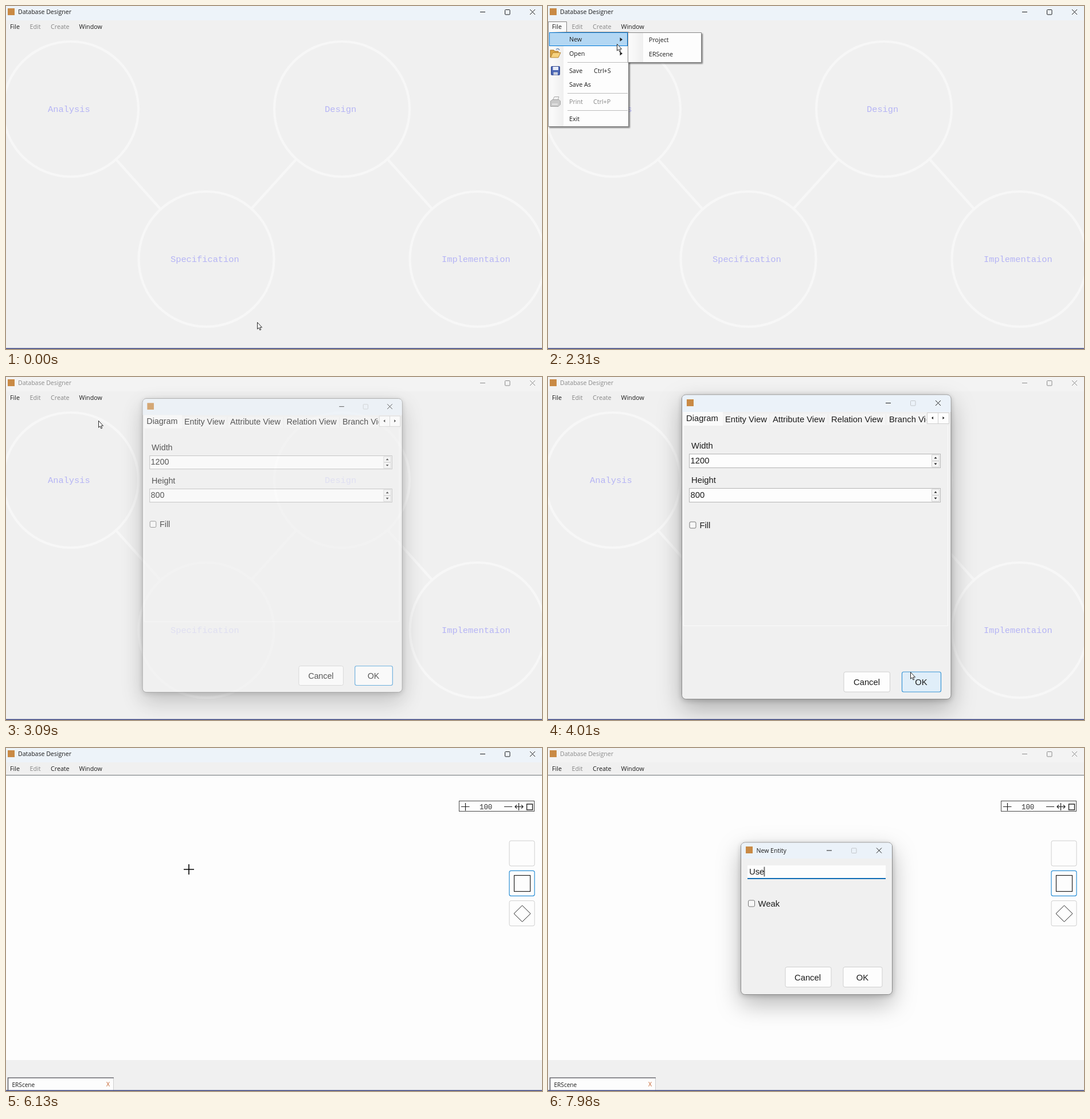
An HTML page that plays this animation: 935x599 px, repeating every 8 s.

```html
<!DOCTYPE html>
<html lang="en">
<head>
<meta charset="utf-8">
<title>Database Designer</title>
<style>
html, body { margin: 0; width: 100%; height: 100%; overflow: hidden; background: #f0f0f0; }
svg { display: block; width: 935px; height: 599px; }
text { white-space: pre; }
.ui { font: 10.7px "Open Sans", "Noto Sans", sans-serif; fill: #1c1c1c; }
.cap { font-size: 10.55px; fill: currentColor; }
.off { fill: #868686; }
.form { font: 14.8px "Liberation Sans", Arial, sans-serif; fill: #1c1c1c; }
.mono { font: 15.35px "Liberation Mono", "Courier New", monospace; fill: #b5b4f5; }
.mid { text-anchor: middle; }
.line { fill: none; stroke: #222; }
.btn { fill: #fdfdfd; stroke: #cfcfcf; }
.picked { fill: #b3d7f3; stroke: #0078d7; }
.sep { stroke: #bdbdbd; }
.field { fill: #fdfdfd; stroke: #b4b4b4; }
.check { fill: #f7f7f7; stroke: #767676; }
.glass { stroke: #8b8b8b; filter: drop-shadow(0 2px 5px rgba(0,0,0,.2)) drop-shadow(0 16px 20px rgba(0,0,0,.27)); }
.menu { fill: #fdfdfd; stroke: #858585; filter: drop-shadow(2.5px 2.5px 1px rgba(0,0,0,.45)); }

/* 1% = 80 ms */
.t { animation: 8s infinite step-end; }

#bar { color: #1c1c1c; animation-name: focus; }
#barBg { animation-name: barBg; }
@keyframes focus {
  0% { color: #1c1c1c } 36.9% { color: #8b8b8b } 55.7% { color: #1c1c1c } 83.8%, to { color: #8b8b8b }
}
@keyframes barBg {
  0% { fill: #edf3f9 } 37.8% { fill: #f3f3f3 } 55.7% { fill: #edf3f9 } 84.7%, to { fill: #f3f3f3 }
}

#fileHover { animation-name: fileHover; }
#fileMenu { animation-name: fileMenu; }
#newRow { animation-name: newRow; }
#subMenu { animation-name: subMenu; }
#subRow { animation-name: subRow; }
@keyframes fileHover { 0% { opacity: 0 } 14.6% { opacity: 1 } 16.2%, to { opacity: 0 } }
@keyframes fileMenu { 0% { opacity: 0 } 16.2% { opacity: 1 } 34.75%, to { opacity: 0 } }
@keyframes newRow { 0% { opacity: 0 } 20.3%, to { opacity: 1 } }
@keyframes subMenu { 0% { opacity: 0 } 25% { opacity: 1 } 34.75%, to { opacity: 0 } }
@keyframes subRow { 0% { opacity: 0 } 30%, to { opacity: 1 } }

#scene { animation-name: scene; }
#createOn { animation-name: scene; }
#tool { animation-name: tool; }
@keyframes scene { 0% { opacity: 0 } 54.1%, to { opacity: 1 } }
@keyframes tool {
  0% { fill: #fdfdfd; stroke: #cfcfcf }
  66.6% { fill: #e0eef9; stroke: #2b8fd6 }
  69.7% { fill: #cce4f7; stroke: #2b8fd6 }
  71.6% { fill: #e0eef9; stroke: #2b8fd6 }
  72.5%, to { fill: #fdfdfd; stroke: #2b8fd6 }
}

#sizeDlg { transform-origin: 366px 221px; animation-name: sizeDlg; }
#sizeOk { stroke: #3a96d6; animation-name: sizeOk; }
@keyframes sizeDlg {
  0% { opacity: 0 }
  36.9% { opacity: .2; transform: scale(.865) }
  37.75% { opacity: .72; transform: scale(.965) }
  38.7% { opacity: .95; transform: scale(.993) }
  39.6% { opacity: 1; transform: none }
  54.1% { opacity: .75; transform: scale(.98) }
  55% { opacity: .4; transform: scale(.94) }
  55.75% { opacity: .12; transform: scale(.91) }
  56.75%, to { opacity: 0 }
}
@keyframes sizeOk { 0% { fill: #fdfdfd } 50% { fill: #e0eef9 } 52.3%, to { fill: #cce4f7 } }

#entityDlg { transform-origin: 468px 297px; animation-name: entityDlg; }
@keyframes entityDlg {
  0% { opacity: 0 }
  83.8% { opacity: .2; transform: scale(.865) }
  84.7% { opacity: .72; transform: scale(.965) }
  85.7% { opacity: .95; transform: scale(.993) }
  86.6%, to { opacity: 1; transform: none }
}
#k1 { animation-name: k1; }
#k2 { animation-name: k2; }
#k3 { animation-name: k3; }
@keyframes k1 { 0% { fill-opacity: 0 } 96%, to { fill-opacity: 1 } }
@keyframes k2 { 0% { fill-opacity: 0 } 98%, to { fill-opacity: 1 } }
@keyframes k3 { 0% { fill-opacity: 0 } 99.7%, to { fill-opacity: 1 } }
#caret { animation-name: caret; }
@keyframes caret {
  0% { opacity: 1; transform: none }
  91.375% { opacity: 0 }
  96% { opacity: 1; transform: translate(10.7px) }
  98% { opacity: 1; transform: translate(18.1px) }
  99.7%, to { opacity: 1; transform: translate(26.3px) }
}

#cursor { animation-name: path; }
#arrow { animation-name: arrow; }
#cross { animation-name: cross; }
@keyframes arrow { 0% { opacity: 1 } 72.5% { opacity: 0 } 83.8% { opacity: 1 } 96%, to { opacity: 0 } }
@keyframes cross { 0% { opacity: 0 } 72.5% { opacity: 1 } 83.8%, to { opacity: 0 } }
@keyframes path {
  0% { transform: translate(438px, 552px) }
  .87% { transform: translate(438px, 552px); animation-timing-function: steps(3, start) }
  3.69% { transform: translate(360px, 455px); animation-timing-function: steps(4, start) }
  7.44% { transform: translate(110px, 165px); animation-timing-function: steps(4, start) }
  11.19% { transform: translate(35px, 72px) }
  11.75% { transform: translate(35px, 72px); animation-timing-function: steps(7, start) }
  17.9% { transform: translate(23px, 37px) }
  19.37% { transform: translate(23px, 37px); animation-timing-function: steps(4, start) }
  23.2% { transform: translate(54px, 61px) }
  24% { transform: translate(54px, 61px); animation-timing-function: steps(5, start) }
  28.9% { transform: translate(120px, 66px); animation-timing-function: steps(3, start) }
  31.9% { transform: translate(168px, 95px); animation-timing-function: steps(2, start) }
  33.9% { transform: translate(161px, 76px) }
  40.6% { transform: translate(161px, 76px); animation-timing-function: steps(5, start) }
  45.37% { transform: translate(430px, 330px); animation-timing-function: steps(6, start) }
  51% { transform: translate(632px, 515px) }
  51.37% { transform: translate(632px, 515px); animation-timing-function: steps(2, start) }
  53.25% { transform: translate(643px, 531px) }
  55.75% { transform: translate(643px, 531px); animation-timing-function: steps(5, start) }
  60.75% { transform: translate(731px, 405px); animation-timing-function: steps(6, start) }
  66.62% { transform: translate(924px, 236px); animation-timing-function: steps(2, start) }
  69.12% { transform: translate(914px, 239px) }
  71.62% { transform: translate(914px, 239px); animation-timing-function: steps(2, start) }
  73.57% { transform: translate(800px, 236px); animation-timing-function: steps(4, start) }
  77.47% { transform: translate(319px, 212px); animation-timing-function: steps(5, start) }
  81.8% { transform: translate(267px, 212px) }
  83.8%, to { transform: translate(275px, 222px) }
}
</style>
</head>
<body>
<svg viewBox="0 0 935 599">
  <defs>
    <linearGradient id="gutter"><stop stop-color="#fcfcfc"/><stop offset="1" stop-color="#efefef"/></linearGradient>
    <clipPath id="tabClip"><path d="M236 60H660V86H236Z"/></clipPath>
    <g id="ctl" fill="none" stroke="currentColor">
      <path d="M0 0H9M87 -4.5l9 9m0 -9l-9 9"/>
      <rect x="43.5" y="-4" width="8.5" height="8.5" rx="1" style="stroke:var(--max, currentColor)"/>
    </g>
    <g id="spin">
      <path d="M.5 .5H13.500V10.500H.5ZM.5 11.500H13.500V21.500H.5Z" fill="#f6f6f6" stroke="#d2d2d2"/>
      <path d="M4.500 7L7 4 9.500 7ZM4.500 15L7 18 9.500 15Z" fill="#222"/>
    </g>
  </defs>

  <rect width="935" height="599" fill="#f0f0f0"/>

  <!-- start page -->
  <g fill="none" stroke="#f7f7f7" stroke-width="4.2">
    <circle cx="113" cy="180" r="118"/>
    <circle cx="349.500" cy="442" r="118"/>
    <circle cx="586" cy="180" r="118"/>
    <circle cx="822.500" cy="442" r="118"/>
    <path d="M192 268L269 354M506 268L429 353M666 268L743 354"/>
  </g>
  <g class="mono">
    <text x="73" y="185">Analysis</text>
    <text x="287" y="447">Specification</text>
    <text x="556" y="185">Design</text>
    <text x="760" y="447">Implementaion</text>
  </g>

  <!-- diagram editor -->
  <g id="scene" class="t">
    <rect y="47" width="935" height="552" fill="#f0f0f0"/>
    <rect y="48" width="935" height="497" fill="#fdfdfd"/>
    <path d="M0 47.500H935" stroke="#6d7376"/>
    <rect x="790.500" y="92.500" width="131" height="18" fill="#fdfdfd" stroke="#4a4a4a"/>
    <path class="line" d="M794 102.500H808.500M801.500 96V109.500M869 102.500H883M888 102.500H902M894.500 96V109M891 99.500L888 102.500 891 105.500M899 99.500L902 102.500 899 105.500" stroke-width="1.2"/>
    <rect class="line" x="908.500" y="98" width="10" height="10" stroke-width="1.4"/>
    <text class="mono" x="826" y="107" style="font-size:12.4px;fill:#333">100</text>
    <rect class="btn" x="878" y="162" width="44" height="44" rx="3"/>
    <rect id="tool" class="btn t" x="878" y="214.300" width="44" height="44" rx="3" stroke-width="1.2"/>
    <rect class="btn" x="878" y="266.700" width="44" height="44" rx="3"/>
    <rect class="line" x="886.500" y="222.500" width="28" height="28" stroke-width="1.2"/>
    <path class="line" d="M900.500 275L915 289.300 900.500 303.500 886 289.300Z"/>
    <rect x="3" y="576" width="185" height="23" fill="#fdfdfd"/>
    <path d="M3.500 599V576H188" fill="none" stroke="#6a6a70" stroke-width="1.6"/>
    <path d="M187.500 577V598" stroke="#d0d0d0"/>
    <text class="ui" x="10.500" y="592" style="font-size:10.1px">ERScene</text>
    <text class="ui" x="175" y="591" style="font-size:10.500px;fill:#c4622d">X</text>
  </g>

  <!-- title and menu bar -->
  <g id="bar" class="t">
    <rect id="barBg" class="t" width="935" height="25" fill="#edf3f9"/>
    <rect x="3" y="4" width="12" height="12" fill="#c98a45"/>
    <text class="ui cap" x="21" y="14">Database Designer</text>
    <use href="#ctl" x="827" y="10.500"/>
  </g>
  <rect id="fileHover" class="picked t" x=".5" y="27.500" width="32" height="17"/>
  <g id="fileMenu" class="t">
    <path class="menu" d="M.5 45.500H140.500V210.500H.5Z"/>
    <rect x="1" y="46" width="26" height="164" fill="url(#gutter)"/>
    <path d="M.5 46V27.500H32.500V45" fill="#fafafa" stroke="#858585"/>
    <rect id="newRow" class="picked t" x="2.500" y="46.500" width="136" height="23"/>
    <path class="sep" d="M34 98.500H139M34 152.500H139M34 182.500H139"/>
    <path d="M125.500 55L130 58.500 125.500 62ZM125.500 79.500L130 83 125.500 86.500Z" fill="#222"/>
    <g class="ui">
      <text x="37" y="62">New</text>
      <text x="37" y="86.500">Open</text>
      <text x="37" y="116.500">Save</text>
      <text x="80" y="116.500">Ctrl+S</text>
      <text x="37" y="141">Save As</text>
      <text class="off" x="37" y="171">Print</text>
      <text class="off" x="79" y="171">Ctrl+P</text>
      <text x="37" y="201">Exit</text>
    </g>
    <path d="M4 90V77H10L12 79H18V82" fill="#d9a441" stroke="#a8742a"/>
    <path d="M4.500 90L8.500 81.500H22L18 90Z" fill="#f6d27e" stroke="#b58433"/>
    <path d="M14 76q4 -3 6 1" fill="none" stroke="#5a83b8" stroke-width="1.3"/>
    <rect x="5.500" y="105.500" width="15" height="15" rx="1" fill="#4a66b4" stroke="#33488c"/>
    <path d="M8.500 106H18V112H8.500Z" fill="#e8edf8"/>
    <path d="M9.500 115.500H17V120.500H9.500Z" fill="#c8cfdf"/>
    <path d="M8 165L11 158.500H19L17 165Z" fill="#f2f2f2" stroke="#aaa"/>
    <path d="M4.500 166L8 163.500H19L21.500 166V172L18 175.500H4.500Z" fill="#c9c9c9" stroke="#a2a2a2"/>
    <path d="M7 171.500H17" stroke="#efefef" stroke-width="1.500"/>
  </g>
  <g id="subMenu" class="t">
    <path class="menu" d="M139.500 46.500H267.500V98.500H139.500Z"/>
    <rect x="140" y="47" width="26" height="51" fill="url(#gutter)"/>
    <rect id="subRow" class="picked t" x="141.500" y="72.500" width="124" height="24"/>
    <g class="ui">
      <text x="176" y="63">Project</text>
      <text x="176" y="88">ERScene</text>
    </g>
  </g>
  <g class="ui">
    <text x="7" y="39.500">File</text>
    <text class="off" x="41.500" y="39.500">Edit</text>
    <text class="off" x="78" y="39.500">Create</text>
    <g id="createOn" class="t">
      <path d="M76 29H113V45H76Z" fill="#f0f0f0"/>
      <text x="78" y="39.500">Create</text>
    </g>
    <text x="127.500" y="39.500">Window</text>
  </g>
  <rect y="597.400" width="935" height="1.600" fill="#414b86"/>

  <!-- diagram size dialog -->
  <g id="sizeDlg" class="t" color="#1c1c1c" style="--max:#c2c6ca">
    <rect class="glass" x="233.500" y="31" width="469.500" height="531.500" rx="7" fill="#f0f0f0"/>
    <path d="M234 61V38q0 -6.500 6.500 -6.500H696q6.500 0 6.500 6.500V61Z" fill="#ebf2f9"/>
    <rect x="242" y="39" width="12" height="12" fill="#c98a45"/>
    <use href="#ctl" x="589" y="45.500"/>
    <path d="M305 64H660V84H305Z" fill="#f4f4f4"/>
    <path d="M236 61H305V85H236Z" fill="#fafafa"/>
    <path d="M386.500 65V83M488.500 65V83M589.500 65V83" stroke="#e9e9e9"/>
    <path d="M236.500 85V434.500H697.500V85" fill="none" stroke="#fafafa"/>
    <g class="form">
      <g clip-path="url(#tabClip)">
        <text x="241" y="77">Diagram</text>
        <text x="309" y="78.500">Entity View</text>
        <text x="392" y="78.500">Attribute View</text>
        <text x="494" y="78.500">Relation View</text>
        <text x="595" y="78.500">Branch View</text>
      </g>
      <path class="btn" d="M661.500 62.500H699.500V81.500H661.500ZM680.500 62.500V81.500"/>
      <path d="M672 69L669 71.500 672 74ZM688.500 69L691.500 71.500 688.500 74Z"/>
      <text x="250" y="125">Width</text>
      <rect class="field" x="246.500" y="134.500" width="438" height="24"/>
      <text x="248.500" y="151">1200</text>
      <use href="#spin" x="669" y="135.500"/>
      <text x="250" y="185">Height</text>
      <rect class="field" x="246.500" y="194.500" width="438" height="24"/>
      <text x="248.500" y="211">800</text>
      <use href="#spin" x="669" y="195.500"/>
      <rect class="check" x="247" y="253" width="11" height="11" rx="2"/>
      <text x="264.500" y="263.500">Fill</text>
      <rect class="btn" x="516" y="515" width="80.500" height="35" rx="3"/>
      <rect id="sizeOk" class="t" x="617.500" y="515" width="68" height="35" rx="3" stroke-width="1.2"/>
      <text class="mid" x="556" y="538">Cancel</text>
      <text class="mid" x="651" y="538">OK</text>
    </g>
  </g>

  <!-- new entity dialog -->
  <g id="entityDlg" class="t" color="#1c1c1c" style="--max:#c2c6ca">
    <rect class="glass" x="336.500" y="165" width="264" height="265.500" rx="7" fill="#f0f0f0"/>
    <path d="M337 193V172q0 -6.500 6.500 -6.500H593.500q6.500 0 6.500 6.500V193Z" fill="#ebf2f9"/>
    <rect x="345" y="172" width="12" height="12" fill="#c98a45"/>
    <text class="ui cap" x="363.500" y="183">New Entity</text>
    <use href="#ctl" x="486" y="179"/>
    <path d="M348 205H589V229H348Z" fill="#fdfdfd"/>
    <path d="M348 228H589" stroke="#0f6cb5" stroke-width="2"/>
    <g class="form">
      <text x="351" y="221"><tspan id="k1" class="t">U</tspan><tspan id="k2" class="t">s</tspan><tspan id="k3" class="t">e</tspan></text>
      <rect id="caret" class="t" x="350.500" y="207.500" width="1.200" height="17"/>
      <rect class="check" x="349.500" y="266" width="11" height="11" rx="2"/>
      <text x="366.500" y="276.500">Weak</text>
      <rect class="btn" x="414" y="382.500" width="80" height="35" rx="3"/>
      <rect class="btn" x="515" y="382.500" width="68" height="35" rx="3"/>
      <text class="mid" x="453" y="405.500">Cancel</text>
      <text class="mid" x="548.500" y="405.500">OK</text>
    </g>
  </g>

  <g id="cursor" class="t">
    <path id="arrow" class="t" d="M.5 .5V12.200L3 9.800 4.900 14 6.700 13.200 4.900 9.200H8.500Z" fill="#fff" stroke="#111" stroke-width=".9"/>
    <path id="cross" class="t" d="M-9 0H9M0 -9V9" stroke="#000" stroke-width="1.600"/>
  </g>
</svg>
</body>
</html>
```
